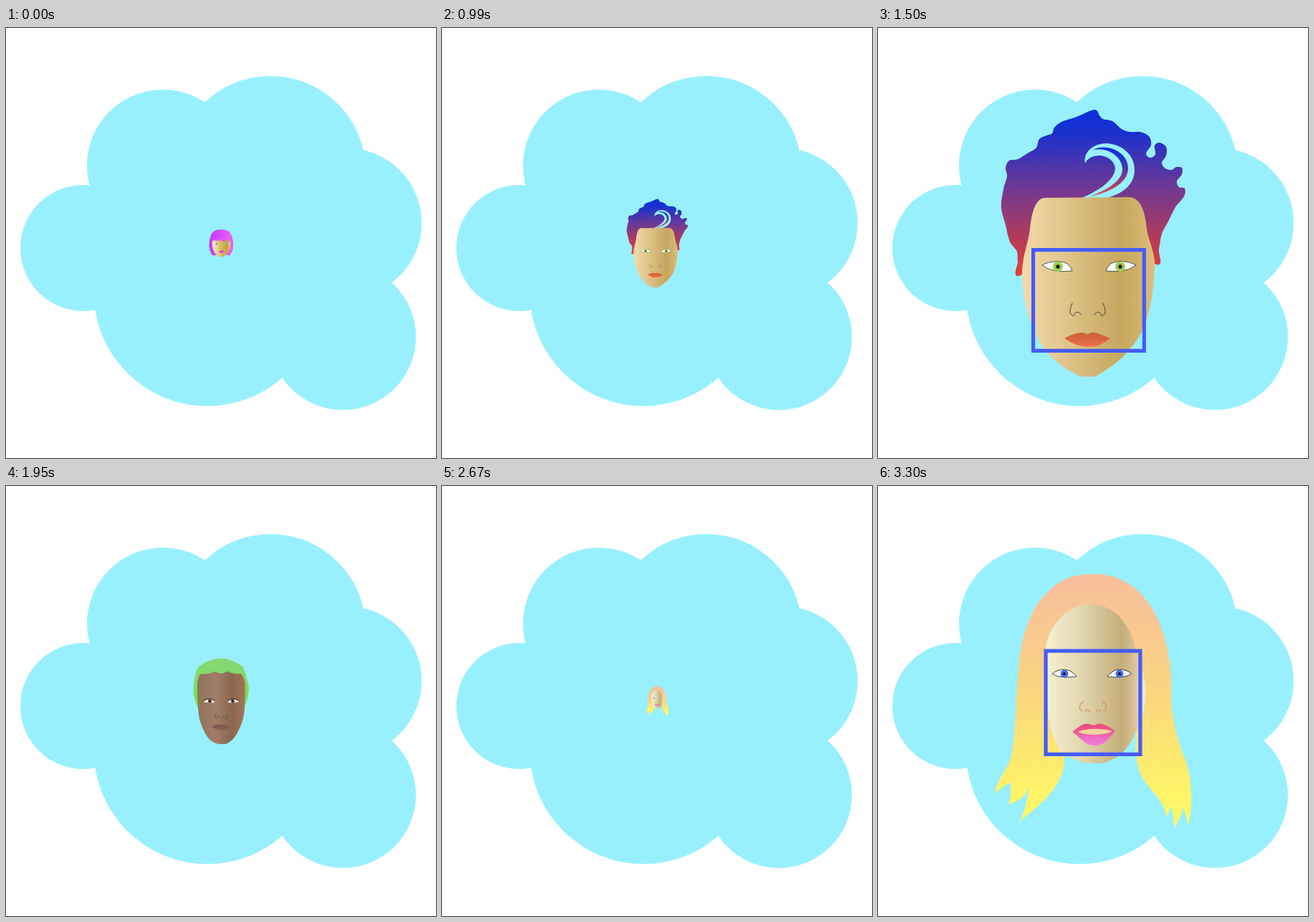
An HTML page that plays this animation: 600 by 600 pixels, repeating every 3.57 s.

```html
<!DOCTYPE html>
<html lang="en">
<head>
<meta charset="utf-8">
<title>Faces in a cloud</title>
<style>
  html, body { margin: 0; width: 100%; height: 100%; overflow: hidden; background: #fff; }
  svg { display: block; width: 100vw; height: 100vh; }
</style>
</head>
<body>
<svg id="stage" viewBox="0 0 600 600"></svg>
<script>
const LOOP = 3570, STEP = 30, MID = 300.3;

// Cloud: circles as cx, cy, r
const cloud = [
  [108, 307, 88], [219, 192, 106], [369, 200, 133],
  [476, 272, 104], [470, 431, 102], [281, 369, 158.5]
];

let defs = '';

// Linear gradient in drawing units; stops alternate offset and colour
function gradient(id, vertical, from, to, ...stops) {
  const line = vertical ? `x1="0" x2="0" y1="${from}" y2="${to}"` : `x1="${from}" x2="${to}" y1="0" y2="0"`;
  let marks = '';
  for (let i = 0; i < stops.length; i += 2)
    marks += `<stop offset="${stops[i]}" stop-color="${stops[i + 1]}"/>`;
  defs += `<linearGradient id="${id}" gradientUnits="userSpaceOnUse" ${line}>${marks}</linearGradient>`;
  return `url(#${id})`;
}

const shape = (d, fill) => `<path d="${d}" fill="${fill}"/>`;
const line = (d, color, width) =>
  `<path d="${d}" fill="none" stroke="${color}" stroke-width="${width}" stroke-linecap="round"/>`;
const dot = (x, y, r, fill) => `<circle cx="${x}" cy="${y}" r="${r}" fill="${fill}"/>`;
const pair = (axis, part) => part + `<g transform="matrix(-1 0 0 1 ${2 * axis} 0)">${part}</g>`;

// Closed smooth curve through points
function smooth(text) {
  const p = text.split(' ').map(s => s.split(',').map(Number)), n = p.length;
  let d = `M${p[0]}`;
  for (let i = 0; i < n; i++) {
    const [a, b, c, e] = [-1, 0, 1, 2].map(k => p[(i + k + n) % n]);
    const c1 = b.map((v, k) => v + (c[k] - a[k]) / 6);
    const c2 = c.map((v, k) => v - (e[k] - b[k]) / 6);
    d += `C${c1} ${c2} ${c}`;
  }
  return d + 'Z';
}

function eye(d, x, y, r, iris, rim, width) {
  return `<path d="${d}" fill="#fff" stroke="${rim}" stroke-width="${width}"/>` +
    dot(x, y, r, iris) + dot(x, y, r * 0.38, '#1c1210');
}

function bob() {
  const hair = gradient('bobHair', false, 195, 406, 0, '#c63afa', 0.3, '#d044fa', 1, '#f262f4');
  const skin = gradient('bobSkin', false, 222, 381, 0, '#f6f1bf', 0.5, '#d8be61', 0.8, '#c8a236', 0.9, '#d2b352', 1, '#eedf9c');
  const lips = gradient('bobLips', true, 365, 386, 0, '#cc3cf4', 0.55, '#d846f4', 1, '#f45ef2');
  return shape('M229,409C205,385 194,345 195,312C196,280 203,255 208,236C219,200 254,181 290,181L312,181' +
      'C350,182 381,200 391,234C398,256 405,280 406,312C406,345 396,385 371,409C366,404 358,405 352,404' +
      'C348,403 346,402 344,400L260,401C254,403 246,406 240,404C236,404 232,406 229,409Z', hair) +
    shape('M222,292Q223,280 227,272Q230,282 236,287Q236,273 241,265Q244,278 251,285Q250,275 252,270Q254,281 259,288' +
      'Q259,275 263,267Q265,279 272,286Q273,272 279,263Q280,279 288,290Q290,276 296,263Q301,276 297,288' +
      'Q304,278 307,268Q311,280 309,291Q314,283 317,275Q319,282 316,291Q324,283 326,275Q328,279 327,286' +
      'Q334,279 336,271Q338,278 335,285Q342,277 344,271Q346,275 347,280Q352,274 353,267Q360,279 357,293' +
      'Q366,280 367,266Q373,279 371,293Q377,284 379,275Q382,284 381,293C380,325 377,345 371,357' +
      'C362,382 346,395 333,405C323,415 318,418 303,419C285,419 280,415 263,404C244,389 233,369 229,350' +
      'C224,330 222,310 222,292Z', skin) +
    pair(302, eye('M243,304C248,297 258,297 266,298C275,300 280,305 283,311C272,311 262,312 253,309C248,307 244,306 243,304Z',
      262, 304, 7, '#a18a7a', '#171512', 1.3)) +
    pair(303, line('M286,336C283,342 282,351 287,352C291,352 290,347 293,347C297,347 299,349 299,353', '#a48a5c', 1.5)) +
    shape('M277,377C283,371 290,366 296,365C299,364.5 300,366 303,366C306,366 308,364 312,365C319,366 324,372 329,376' +
      'C324,380 320,385 314,385.5L290,385.5C285,384 281,380 277,377Z', lips);
}

function quiff() {
  const hair = gradient('quiffHair', true, 114, 344, 0, '#0c2edc', 0.14, '#1a31ce', 0.5, '#75398f', 0.8, '#b83c55', 1, '#e2403a');
  const curl = gradient('quiffCurl', true, 163, 236, 0, '#0c2edc', 0.25, '#2035cc', 0.7, '#943c78', 1, '#e2503a');
  const skin = gradient('quiffSkin', false, 201, 386, 0, '#f2daa8', 0.3, '#e2c68e', 0.74, '#c6a75e', 0.9, '#d2b26c', 1, '#e0c080');
  const lips = gradient('quiffLips', true, 425, 445, 0, '#c9663a', 0.45, '#d8643c', 1, '#f07550');
  return shape(smooth('201,344 195,325 194,312 184,298 178,275 172,250 175,225 180,207 178,195 183,185 195,183 210,174 ' +
      '221,167 225,155 235,150 243,147 246,139 256,131 277,124 302,114 309,122 314,127 327,130 340,141 352,145 366,145 ' +
      '378,151 381,163 374,175 380,181 387,176 386,164 393,160 402,166 402,178 396,188 401,196 410,198 416,194 424,195 ' +
      '424,204 417,214 420,222 428,224 427,235 415,250 405,270 396,287 392,308 386,329 300,270'), hair) +
    shape('M289,189C286,172 302,161 318,161C342,162 358,178 358,198C358,216 345,230 320,237L284,237' +
      'C305,229 330,213 331,196C330,184 318,178 309,178C299,178 292,182 289,189Z', '#98f0ff') +
    shape('M300,170C318,160 350,172 349,197C348,218 320,230 296,235C322,225 342,212 341,196C340,180 322,166 300,170Z', curl) +
    shape('M232,237L352,236C365,238 371,252 374,272C376,295 384,305 386,325C386,350 384,385 370,420C355,450 335,468 304,486' +
      'C297,487 290,487 282,486C255,474 232,455 219,425C207,400 201,370 201,340C202,315 210,300 212,280C214,258 220,238 232,237Z', skin) +
    pair(294.5, eye('M229,331C238,325 256,324 264,329C268,332 270,335 271,339C258,340 243,341 229,331Z',
      251, 333, 7, '#9dd04c', '#3c4040', 0.9)) +
    pair(292.5, line('M271,384C268,391 266,398 271,401C275,403 273,398 276,397C279,396 282,397 283,400', '#4c4438', 1)) +
    shape('M260,433C268,429 276,425 284,425C288,425 290,427 292,427C295,427 297,424 302,425C311,427 317,430 324,433' +
      'C317,438 311,443 304,444C296,445 287,445 280,443C272,441 266,437 260,433Z', lips);
}

function crop() {
  const hair = gradient('cropHair', true, 164, 320, 0, '#88d876', 0.4, '#80dc66', 1, '#72e444');
  const skin = gradient('cropSkin', false, 224, 377, 0, '#92715a', 0.38, '#a07d68', 0.72, '#8b6750', 1, '#a5745a');
  const lips = gradient('cropLips', true, 374, 394, 0, '#7e5a50', 0.45, '#875852', 1, '#9a665f');
  return shape('M226,321C218,300 212,285 212,267C213,240 217,212 225,196C240,177 275,164 300,164C328,164 355,180 369,191' +
      'C376,203 380,222 384,236C387,248 388,255 388,265C386,285 381,303 375,317Z', hair) +
    shape('M224,252C225,235 229,215 238,213C252,215 266,212 275,208C280,205 285,206 289,210C293,213 305,213 310,210' +
      'C316,205 321,205 326,208C337,213 350,214 362,213C370,215 376,238 377,250C376,270 376,300 374,330C372,346 370,360 366,368' +
      'C358,390 348,410 338,420C330,427 324,432 318,435C308,437 296,437 286,435C268,430 258,417 250,404' +
      'C243,390 236,373 232,360C226,335 225,285 224,252Z', skin) +
    pair(300.5, eye('M244,303C250,295 262,293 270,296C276,298 279,301 281,304C270,305 255,305 244,303Z',
        264, 300, 5.6, '#53362a', 'none', 0) +
      line('M243,302C250,294 262,292 270,295C276,297 279,300 281,303', '#2c1c16', 1.1) +
      line('M243,299C252,290 268,289 279,296', '#3a261c', 0.9)) +
    pair(300, line('M285,339C280,342 279,350 281,354C284,358 287,357 286,353C286,349 291,349 295,351', '#3a2418', 1)) +
    shape('M270,382C278,378 283,374 290,374C296,373 298,375 300,375C303,375 305,373 310,374C318,375 323,379 329,383' +
      'C321,387 314,391 306,394C299,394 294,394 290,393C283,390 277,386 270,382Z', lips);
}

function long() {
  const hair = gradient('longHair', true, 123, 478, 0, '#f8bf9c', 0.12, '#f8c396', 0.5, '#fbd87c', 0.85, '#fff368', 1, '#fff962');
  const skin = gradient('longSkin', false, 233, 374, 0, '#f6f1d2', 0.35, '#e2d8b0', 0.76, '#c5ad7a', 0.88, '#d6c296', 1, '#f6ecd0');
  const lips = gradient('longLips', true, 332, 362, 0, '#ee4a80', 0.4, '#ee5896', 0.65, '#f06cc8', 1, '#f07cdc');
  return shape('M298,123C340,121 372,145 390,185C405,220 410,250 409,295C410,330 420,360 430,385C438,410 440,445 433,473' +
      'C430,463 428,455 426,448C424,458 419,468 413,477C413,465 411,453 408,446C407,453 405,458 403,462' +
      'C398,435 378,425 368,405C358,385 358,365 361,335L240,335C242,355 260,362 260,380C260,420 225,445 198,468' +
      'C206,452 209,435 210,421C205,435 195,440 182,444C185,435 187,425 184,414C176,418 168,424 163,430' +
      'C167,405 183,395 187,372C192,340 192,300 196,255C199,215 210,170 240,145C258,128 275,123 298,123Z', hair) +
    shape('M296,165C325,165 345,185 355,212C362,240 374,262 374,290C373,320 362,340 354,355C343,375 325,384 312,387' +
      'L285,386C272,380 262,378 255,370C243,352 237,330 235,290C232,262 232,235 236,215C246,185 270,165 296,165Z', skin) +
    pair(298.5, eye('M243,262C248,257 260,254 268,258C272,260 275,263 277,266C265,267 252,268 243,262Z',
      260, 262, 5.5, '#4a6cf4', '#2c2c30', 0.9)) +
    pair(300, line('M287,301C280,304 280,312 285,314M290,315C290,310 295,311 295,316', '#dc8468', 1.1)) +
    shape('M271,343C278,338 284,332 290,332C295,331 298,334 301,334C304,334 306,331 311,332C320,334 326,338 331,342' +
      'C326,348 318,360 306,362C290,364 285,353 271,343Z', lips) +
    shape('M279,343C288,338 315,338 327,342C318,348 290,349 279,343Z', '#f0d6a0');
}

// start, steps to full size, box time, first scale, scale of the drawing, box edges
const faces = [
  { art: bob, start: 0, steps: 16, boxAt: 600, first: 0.143, drawn: 0.893, box: [215, 268, 386, 433] },
  { art: quiff, start: 840, steps: 18, boxAt: 1500, first: 0.075, drawn: 1, box: [214, 307, 374, 453] },
  { art: crop, start: 1770, steps: 19, boxAt: 2400, first: 0.088, drawn: 0.856, box: [218, 268, 382, 424] },
  { art: long, start: 2670, steps: 19, boxAt: 3300, first: 0.1157, drawn: 1, box: [231.5, 227.5, 368.5, 377] }
];

const frame = ([l, t, r, b]) =>
  `<rect x="${l + 2.6}" y="${t + 2.6}" width="${r - l - 5.2}" height="${b - t - 5.2}" fill="none" stroke="#445cfc" stroke-width="5.2"/>`;

const body = cloud.map(c => dot(...c, '#98f0ff')).join('') +
  faces.map(f => `<g class="face">${f.art()}</g><g class="box">${frame(f.box)}</g>`).join('');
const stage = document.getElementById('stage');
stage.innerHTML = `<defs>${defs}</defs>${body}`;
const faceNodes = stage.querySelectorAll('.face'), boxNodes = stage.querySelectorAll('.box');

function draw(now) {
  const t = now % LOOP;
  const current = faces.filter(f => t >= f.start).length - 1;
  faces.forEach((f, i) => {
    const on = i === current;
    faceNodes[i].style.display = on ? '' : 'none';
    boxNodes[i].style.display = on && t >= f.boxAt ? '' : 'none';
    if (!on) return;
    const step = Math.min(f.steps, Math.floor((t - f.start) / STEP));
    const k = (f.first + (1 - f.first) * step / f.steps) / f.drawn;
    faceNodes[i].setAttribute('transform', `translate(${MID} ${MID}) scale(${k}) translate(${-MID} ${-MID})`);
  });
}

const begin = performance.now();
function tick() {
  draw(performance.now() - begin);
  requestAnimationFrame(tick);
}
tick();
</script>
</body>
</html>
```
